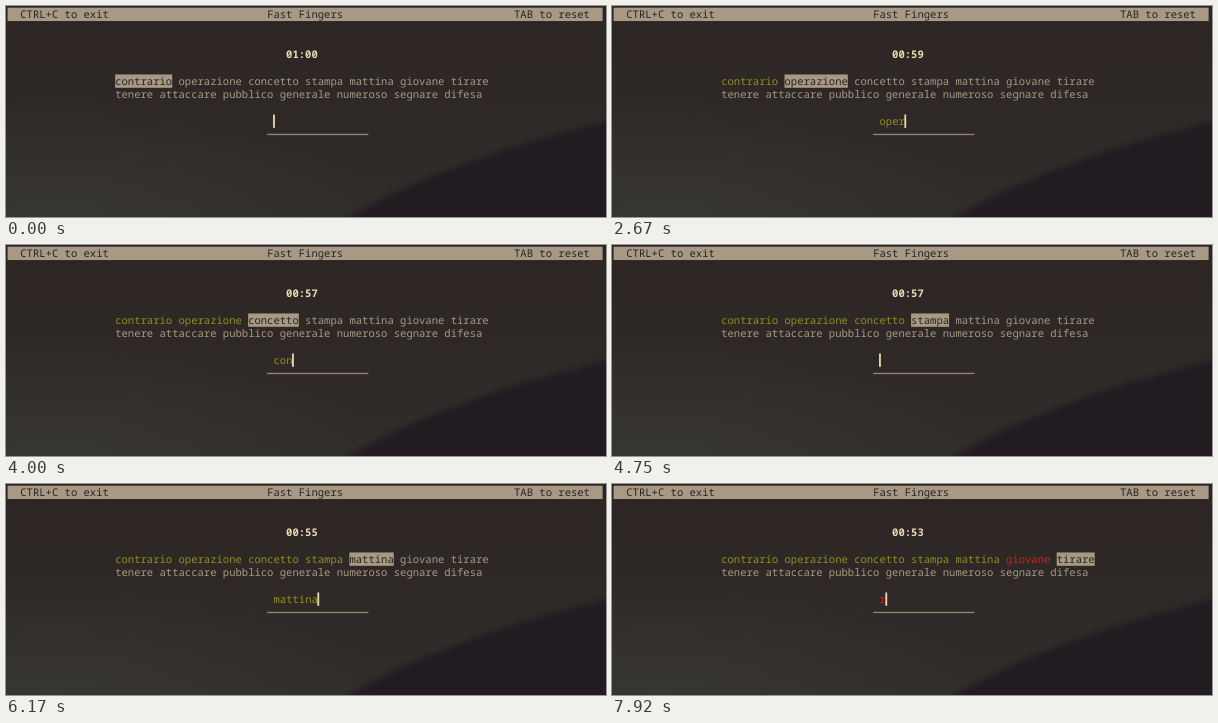
Animation of 600x211 px, one loop 8 s. Source, as an HTML page:

```html
<!DOCTYPE html>
<html lang="it">
<head>
<meta charset="utf-8">
<title>Fast Fingers</title>
<style>
html, body { margin: 0; width: 100%; height: 100%; overflow: hidden; background: #2e2926; }
svg { display: block; }
text {
  font: 10.55px "Noto Sans Mono", "DejaVu Sans Mono", monospace;
  text-rendering: geometricPrecision;
  white-space: pre;
}
</style>
</head>
<body>
<svg id="stage" width="600" height="211" viewBox="0 0 600 211">
  <defs>
    <linearGradient id="sky" x1="0" y1="0" x2="0" y2="1">
      <stop offset="0" stop-color="#2c2523"/>
      <stop offset=".5" stop-color="#2e2927"/>
      <stop offset="1" stop-color="#312d2b"/>
    </linearGradient>
    <radialGradient id="haze" cx="0.08" cy="1" r=".55">
      <stop offset="0" stop-color="#393835" stop-opacity=".8"/>
      <stop offset="1" stop-color="#393835" stop-opacity="0"/>
    </radialGradient>
    <linearGradient id="hill" x1="0" y1="0" x2="1" y2="1">
      <stop offset="0" stop-color="#272121"/>
      <stop offset="1" stop-color="#211d20"/>
    </linearGradient>
    <filter id="soft"><feGaussianBlur stdDeviation="2"/></filter>
  </defs>
  <rect width="600" height="211" fill="url(#sky)"/>
  <rect width="600" height="211" fill="url(#haze)"/>
  <path d="M335 216 C385 184 430 168 480 150 S565 126 610 112 V220 H335Z" fill="url(#hill)" filter="url(#soft)"/>
</svg>
<script>
const LOOP = 8000, CELL = 6.33, ROW = 13.35;
const SAND = '#a89984', DARK = '#282423', CREAM = '#ebdbb2', GREEN = '#918f1c', RED = '#c5281f';
const FIRST_TICK = 1900, WORD_COL = 17, INPUT_COL = 42, INPUT_ROW = 8;

const lines = [
  'contrario operazione concetto stampa mattina giovane tirare',
  'tenere attaccare pubblico generale numeroso segnare difesa'
];

// typed letters and the time of each key; the extra time is the space bar
const typing = [
  ['contrario', [1000, 1130, 1260, 1390, 1520, 1640, 1740, 1830, 1920, 2040]],
  ['operazione', [2170, 2330, 2490, 2660, 2830, 2960, 3080, 3200, 3300, 3410, 3500]],
  ['concetto', [3650, 3830, 3960, 4100, 4220, 4340, 4450, 4560, 4750]],
  ['stampa', [4870, 5000, 5110, 5210, 5320, 5450, 5580]],
  ['mattina', [5670, 5760, 5850, 5930, 6010, 6090, 6160, 6330]],
  ['giocane', [6500, 6640, 6780, 6950, 7080, 7250, 7400, 7600]],
  ['r', [7850]]
];

const stage = document.getElementById('stage');
const colX = c => 1.6 + c * CELL;
const rowY = r => 1.7 + r * ROW;

function add(tag, attrs, parent = stage) {
  const el = document.createElementNS('http://www.w3.org/2000/svg', tag);
  for (const k in attrs) el.setAttribute(k, attrs[k]);
  return parent.appendChild(el);
}
function box(col, row, cols, fill) {
  return add('rect', { x: colX(col), y: rowY(row), width: cols * CELL, height: ROW, fill });
}
function label(col, row, str, fill, parent) {
  const el = add('text', { x: colX(col), y: rowY(row) + 10.3, fill }, parent);
  el.textContent = str;
  return el;
}

box(0, 0, 94, SAND);
label(2, 0, 'CTRL+C to exit', DARK);
label(41, 0, 'Fast Fingers', DARK);
label(80, 0, 'TAB to reset', DARK);

const clock = label(44, 3, '01:00', CREAM);
clock.style.fontWeight = 700;

const mark = box(WORD_COL, 5, 1, SAND);
const words = [];
lines.forEach((line, i) => {
  let col = WORD_COL;
  for (const str of line.split(' ')) {
    words.push({ str, col, el: label(col, 5 + i, str, SAND) });
    col += str.length + 1;
  }
});

add('rect', { x: colX(41), y: 127.8, width: 16 * CELL, height: 1.3, fill: '#8f886f' });
const input = label(INPUT_COL, INPUT_ROW, '', GREEN);
const cursor = add('rect', { y: rowY(INPUT_ROW), width: 1.8, height: ROW, fill: CREAM });

function render(t) {
  const ticks = t < FIRST_TICK ? 0 : 1 + Math.floor((t - FIRST_TICK) / 1000);
  clock.textContent = ticks ? '00:' + (60 - ticks) : '01:00';

  const now = typing.findIndex(([str, keys]) => !(t >= keys[str.length]));
  words.forEach((w, i) => {
    const fill = i === now ? DARK : i > now ? SAND : typing[i][0] === w.str ? GREEN : RED;
    w.el.setAttribute('fill', fill);
  });
  const word = words[now];
  mark.setAttribute('x', colX(word.col));
  mark.setAttribute('width', word.str.length * CELL);

  const [str, keys] = typing[now];
  const count = keys.filter(k => t >= k).length;
  input.textContent = '';
  [...str.slice(0, count)].forEach((ch, i) => {
    add('tspan', { fill: ch === word.str[i] ? GREEN : RED }, input).textContent = ch;
  });
  cursor.setAttribute('x', colX(INPUT_COL + count) - 0.4);
}

const start = performance.now();
function loop() {
  render((performance.now() - start) % LOOP);
  requestAnimationFrame(loop);
}
loop();
</script>
</body>
</html>
```
